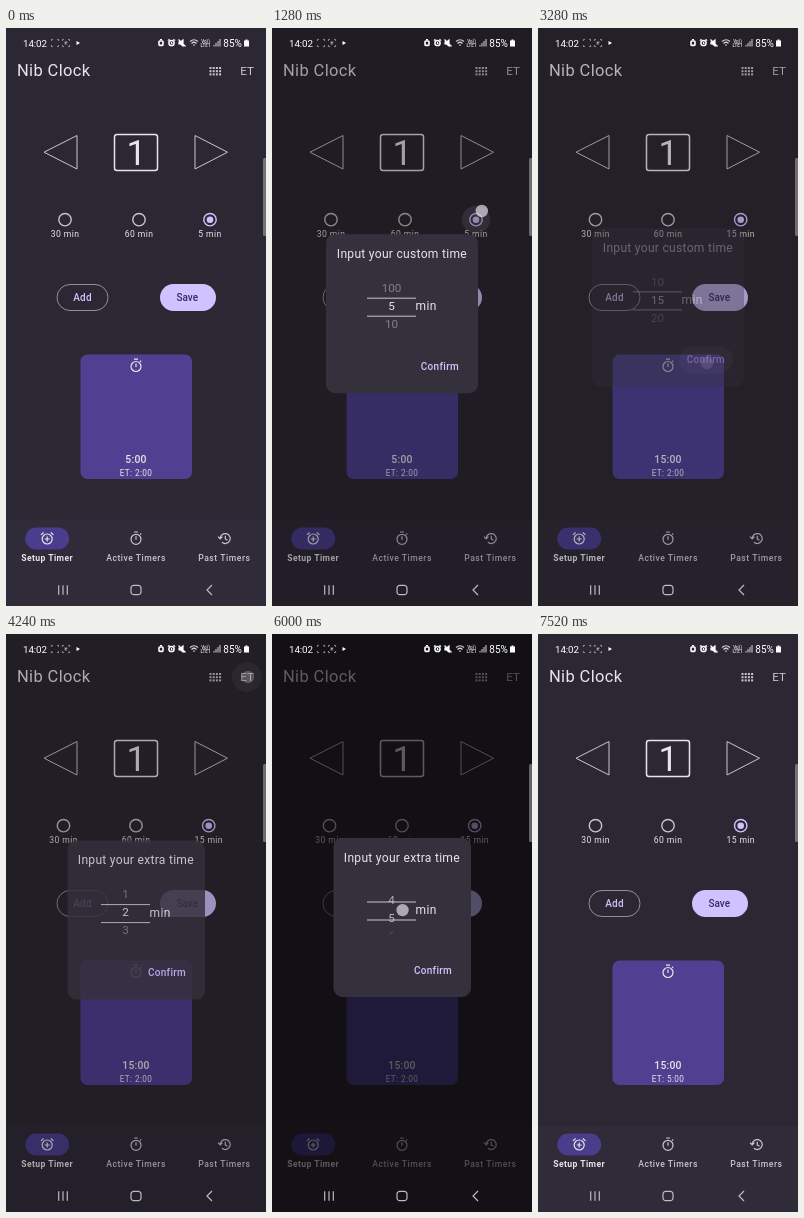
Write an HTML page that moves like this. It is 260 by 578 pixels and loops after 7.6 s.

```html
<!DOCTYPE html>
<html lang="en">
<head>
<meta charset="utf-8">
<title>Timer setup</title>
<style>
  html, body { margin: 0; width: 100%; height: 100%; overflow: hidden; background: #2c2833; }
  svg { display: block; width: 260px; height: 578px; font-family: Roboto, "Open Sans", sans-serif; }
  .mid { text-anchor: middle; }
  .med { font-weight: 500; }
  .line { fill: none; stroke: currentColor; stroke-width: 1.2; }
</style>
</head>
<body>
<svg id="stage" viewBox="0 0 260 578"></svg>
<script>
const LOOP = 7600, STEP = 80, ROW = 18;
const ACCENT = '#cfc3ff', SOFT = '#cac4d0', LIGHT = '#e9e3ec';

const text = (x, y, size, fill, str, cls = 'mid', extra = '') =>
  `<text x="${x}" y="${y}" font-size="${size}" fill="${fill}" class="${cls}" ${extra}>${str}</text>`;
const icon = (x, y, color, body) =>
  `<g transform="translate(${x} ${y})" color="${color}" class="line">${body}</g>`;
const range = n => [...Array(n).keys()];

const stopwatch = '<circle cy="1" r="5"/><path d="M-2-6.3H2M0-2V1.5M4-3.6L5.2-4.8"/>';
const alarmAdd = '<circle cy=".7" r="5"/><path d="M-2.5 .7H2.5M0-1.8V3.2M-6.3-3.4L-3.6-5.8M6.3-3.4L3.6-5.8"/>';
const history = '<path d="M-4.3 .4A5 5 0 1 1-2.6 4M-6.5-1.6L-4.3 .6L-2.1-1.6M.8-2.6V.6L3 2"/>';
const brackets = '<path d="M-3.6-2V-3.6H-2M2-3.6H3.6V-2M3.6 2V3.6H2M-2 3.6H-3.6V2" stroke-width=".8"/>';

const radio = i => `<g id="radio${i}">
  <circle r="6.2" cy="191.7" fill="none" stroke="${i === 2 ? ACCENT : SOFT}" stroke-width="1.4"/>
  ${i === 2 ? `<circle r="3.3" cy="191.7" fill="${ACCENT}"/>` : ''}
  ${text(0, 209, 8.6, LIGHT, ['30 min', '60 min', ''][i], 'mid', `id="label${i}" letter-spacing=".4"`)}</g>`;

const gridDots = range(12).map(i =>
  `<rect x="${203.5 + i % 4 * 3.2}" y="${39 + Math.floor(i / 4) * 3.2}" width="2" height="2" fill="${SOFT}"/>`).join('');

const appLayer = `
  <rect width="260" height="578" fill="#2c2833"/>
  <rect y="492" width="260" height="86" fill="#2f2b38"/>
  ${text(11, 48, 16.5, LIGHT, 'Nib Clock', '', 'letter-spacing=".35"')}
  ${gridDots}
  <circle id="menuRipple" cx="241" cy="43" r="15" fill="#fff"/>
  ${text(241, 46.8, 11.6, SOFT, 'ET')}
  <path d="M71 107.5V141L38 124.2ZM189 107.5V141L221.5 124.2Z" fill="none" stroke="${SOFT}"/>
  <rect x="108.5" y="106.5" width="43" height="36" rx="2.5" fill="none" stroke="${LIGHT}" stroke-width="1.5"/>
  ${text(130.4, 137, 35, LIGHT, '1')}
  <circle id="radioRipple" cx="204" cy="191.7" r="14" fill="#fff"/>
  ${range(3).map(radio).join('')}
  <rect x="51" y="256.5" width="51" height="26" rx="13" fill="none" stroke="#938f99"/>
  ${text(76.5, 273, 10, ACCENT, 'Add', 'mid med', 'letter-spacing=".2"')}
  <rect x="154" y="256" width="56" height="27" rx="13.5" fill="${ACCENT}"/>
  ${text(181.3, 273, 10, '#37296e', 'Save', 'mid med')}
  <rect x="74.5" y="326.5" width="111.5" height="124.5" rx="7" fill="#4f4091"/>
  ${icon(130, 337.5, LIGHT, stopwatch)}
  ${text(130, 435, 10.4, LIGHT, '', 'mid med', 'id="duration" letter-spacing=".2"')}
  ${text(130, 448, 8.2, LIGHT, '', 'mid', 'id="extra" letter-spacing=".4"')}
  <rect x="19.2" y="499.5" width="44" height="22" rx="11" fill="#4a3d8b"/>
  ${icon(41.2, 510.3, LIGHT, alarmAdd)}
  ${icon(130, 510.3, SOFT, stopwatch)}
  ${icon(218.5, 510.3, SOFT, history)}
  ${text(41.2, 533, 8.6, LIGHT, 'Setup Timer', 'mid', 'font-weight="700" letter-spacing=".42"')}
  ${text(130, 533, 8.6, SOFT, 'Active Timers', 'mid med', 'letter-spacing=".52"')}
  ${text(218.3, 533, 8.6, SOFT, 'Past Timers', 'mid med', 'letter-spacing=".55"')}`;

const systemLayer = `
  <rect x="257" y="130" width="4" height="78" rx="1.5" fill="#fff" opacity=".35"/>
  ${text(17, 18.5, 9.8, '#fff', '14:02', '', 'letter-spacing="-.1"')}
  ${icon(49, 15, '#a9a6ae', brackets)}
  ${icon(60, 15, '#a9a6ae', brackets + '<path d="M-1.3-1.3L1.3 1.3M1.3-1.3L-1.3 1.3"/>')}
  <path d="M70.5 13L74 15L70.5 17Z" fill="#fff"/>
  ${icon(155, 15, '#fff', '<rect x="-2" y="-2" width="4" height="4.4" rx=".8" stroke-width="1.6"/><path d="M-1-3.4H1"/>')}
  ${icon(165.5, 15, '#fff', '<circle r="2.6" stroke-width="1.5"/><path d="M-3.6-2.4L-2-3.8M3.6-2.4L2-3.8M0-1V.5H1"/>')}
  ${icon(176, 15, '#fff', '<path d="M-3-1H-1.5L1-3V3L-1.5 1H-3ZM-3.5-3.5L3.5 3.5" fill="currentColor"/>')}
  ${icon(188, 15, '#d0ced2', '<path d="M-4-1.5Q0-5 4-1.5M-2.5 .5Q0-2 2.5 .5M-.8 2.2H.8"/>')}
  ${text(199.5, 14.5, 4.6, '#e5e3e7', 'Vo))', 'mid med')}
  ${text(199.5, 18.8, 4.6, '#e5e3e7', 'LTE1', 'mid med')}
  ${icon(210.5, 15, '#b9b6bd', '<path d="M-2.5 3.5V2M-.5 3.5V0M1.5 3.5V-2M3.5 3.5V-4"/>')}
  ${text(226.6, 18.5, 10, '#fff', '85%')}
  <path d="M238 12.5H239.5V11.5H241.5V12.5H243V18.5H238Z" fill="#fff"/>
  ${icon(57, 562, '#bdbac2', '<path d="M-4.3-4.8V4.8M0-4.8V4.8M4.3-4.8V4.8"/>')}
  ${icon(130, 562, '#bdbac2', '<rect x="-5" y="-4.7" width="10" height="9.4" rx="2.8"/>')}
  ${icon(203.5, 562, '#bdbac2', '<path d="M2.5-5L-2.5 0L2.5 5"/>')}`;

const dialogs = [
  { id: 'custom', title: 'Input your custom time', x: 54, w: 152, confirmX: 167.9, press: 2960,
    open: 1160, close: 3150, value: i => (((i - 1) % 20 + 20) % 20 + 1) * 5, start: 1,
    drags: [{ from: 1720, to: 2440, rows: 2 }] },
  { id: 'more', title: 'Input your extra time', x: 61.5, w: 137.5, confirmX: 161, press: 6880,
    open: 4140, close: 7090, value: i => i, start: 2,
    drags: [{ from: 4960, to: 5480, rows: 2 }, { from: 5760, to: 6200, rows: 1 }] }
];

const dialogMarkup = d => `<g id="${d.id}">
  <rect x="${d.x}" y="204" width="${d.w}" height="159" rx="9" fill="#35313c"/>
  ${text(129.9, 227.8, 12.1, LIGHT, d.title, 'mid', 'letter-spacing=".27"')}
  <g clip-path="url(#wheel)">${range(5).map(i => text(119.5, 0, 11.7, LIGHT, '', 'mid', `id="${d.id}Row${i}"`)).join('')}</g>
  <path d="M95 268H144M95 286H144" stroke="${SOFT}" stroke-width="1"/>
  ${text(143.6, 280, 12, LIGHT, 'min', '', 'letter-spacing=".4"')}
  <rect id="${d.id}Ripple" x="${d.confirmX - 27}" y="322.5" width="54" height="27" rx="13.5" fill="${ACCENT}"/>
  ${text(d.confirmX, 339.6, 10, ACCENT, 'Confirm', 'mid med', 'letter-spacing=".3"')}</g>`;

const touches = [
  { from: 640, to: 1400, x: 209.8, y: 183 },
  { from: 1680, to: 2500, x: 127, y: 296, dx: 14, dy: -52, drag: dialogs[0].drags[0] },
  { from: 2960, to: 3150, x: 169, y: 335 },
  { from: 4000, to: 4140, x: 242, y: 43 },
  { from: 4920, to: 5500, x: 126, y: 298, dx: 12, dy: -48, drag: dialogs[1].drags[0] },
  { from: 5720, to: 6220, x: 126, y: 292, dx: 8, dy: -28, drag: dialogs[1].drags[1] },
  { from: 6880, to: 7060, x: 165, y: 335 }
];

document.getElementById('stage').innerHTML = `
  <clipPath id="wheel"><rect x="90" y="252" width="60" height="48.5"/></clipPath>
  ${appLayer}
  <rect id="scrim" width="260" height="578"/>
  ${dialogs.map(dialogMarkup).join('')}
  ${systemLayer}
  <circle id="touch" r="6.2" fill="#d6d2dc"/>`;

const el = id => document.getElementById(id);
const set = (id, attrs) => Object.entries(attrs).forEach(([k, v]) => el(id).setAttribute(k, v));
const clamp = v => Math.max(0, Math.min(1, v));
const progress = (t, from, to) => clamp((t - from) / (to - from));
const ease = p => p * p * (3 - 2 * p);
const dragAmount = (t, d) => ease(progress(t, d.from, d.to));
const ripple = (t, from, to) => 0.12 * progress(t, from, from + 120) * (1 - progress(t, to, to + 200));

function drawDialog(d, t) {
  const enter = progress(t, d.open, d.open + 240);
  const leave = progress(t, d.close, d.close + 200);
  const alpha = clamp(enter * 2) * (1 - leave);
  set(d.id, { opacity: alpha, transform: `translate(0 ${4.4 * (1 - enter) - 6.3 * leave})` });
  set(d.id + 'Ripple', { opacity: ripple(t, d.press, d.close + 100) });

  const position = d.drags.reduce((sum, drag) => sum + drag.rows * dragAmount(t, drag), d.start);
  const center = Math.round(position);
  range(5).forEach(i => {
    const index = center + i - 2, dy = (index - position) * ROW;
    const id = d.id + 'Row' + i;
    el(id).textContent = d.value(index);
    set(id, { y: 279.8 + dy, opacity: clamp(1 - Math.abs(dy) * 0.031) });
  });
  return enter * (1 - leave);
}

function drawTouch(t) {
  const touch = touches.find(c => t >= c.from && t < c.to + 160);
  if (!touch) return set('touch', { opacity: 0 });
  const p = touch.drag ? dragAmount(t, touch.drag) : 0;
  set('touch', {
    cx: touch.x + (touch.dx || 0) * p,
    cy: touch.y + (touch.dy || 0) * p,
    opacity: 0.75 * (1 - progress(t, touch.to, touch.to + 160))
  });
}

function render(t) {
  const customSet = t >= dialogs[0].close, extraSet = t >= touches[6].to;
  const centers = customSet ? [57.5, 130, 202.7] : [59, 133, 204];
  centers.forEach((x, i) => set('radio' + i, { transform: `translate(${x} 0)` }));
  el('label2').textContent = customSet ? '15 min' : '5 min';
  el('duration').textContent = customSet ? '15:00' : '5:00';
  el('extra').textContent = extraSet ? 'ET: 5:00' : 'ET: 2:00';
  set('radioRipple', { opacity: ripple(t, 640, 1400) });
  set('menuRipple', { opacity: ripple(t, 4000, 4140) });
  const dim = Math.max(...dialogs.map(d => drawDialog(d, t)));
  set('scrim', { opacity: 0.6 * dim });
  drawTouch(t);
}

const began = performance.now();
function tick() {
  const t = (performance.now() - began) % LOOP;
  render(Math.floor(t / STEP) * STEP);
  requestAnimationFrame(tick);
}
tick();
</script>
</body>
</html>
```
